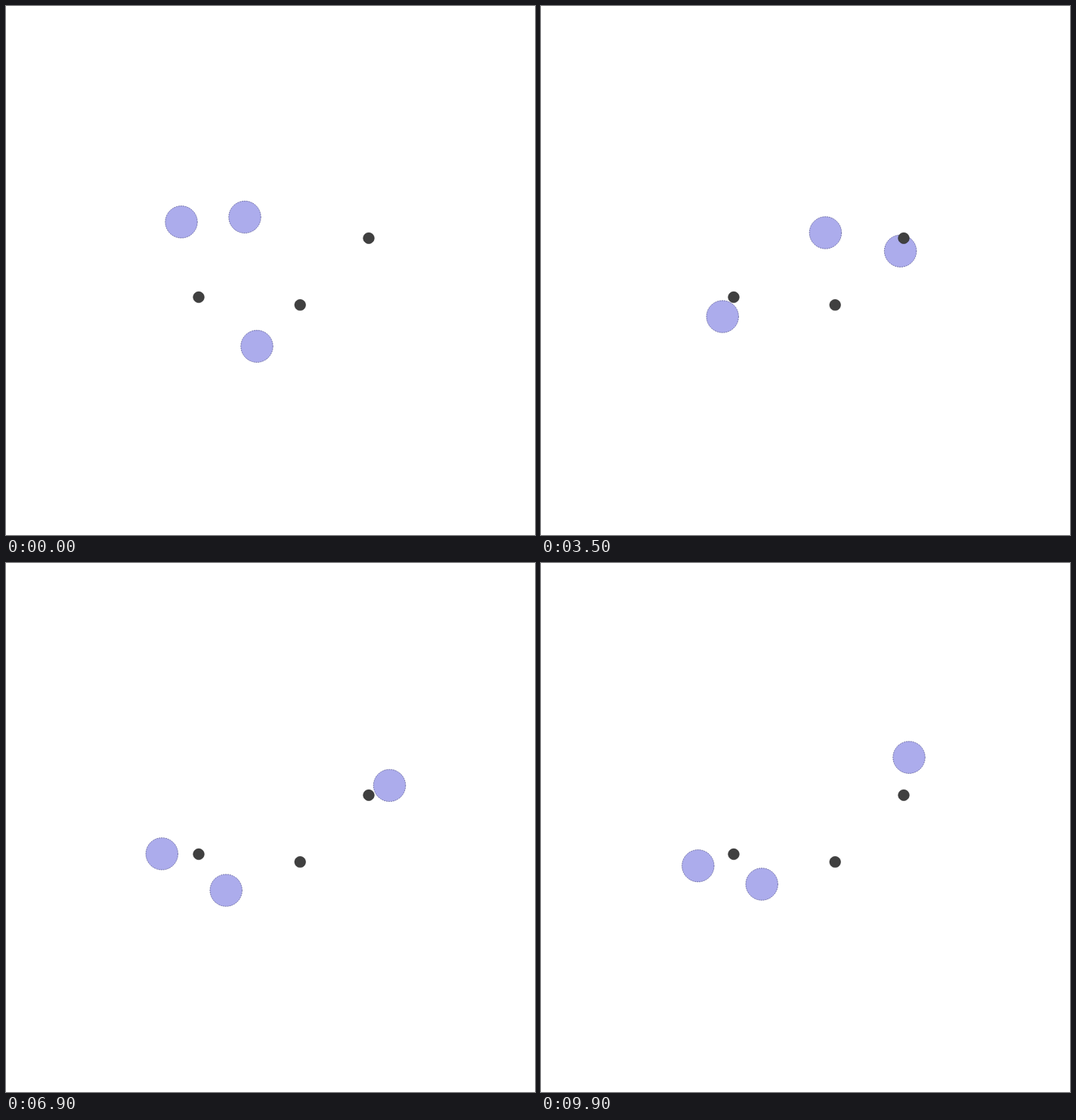
Recreate the animation shown at these times as an HTML page with a canvas. Size 700 by 700 pixels, loop 10 s.

```html
<!DOCTYPE html>
<html lang="en">
<head>
<meta charset="utf-8">
<title>Agents and landmarks</title>
<style>
  html, body { margin: 0; width: 100%; height: 100%; overflow: hidden; background: #fff; }
  canvas { display: block; }
</style>
</head>
<body>
<canvas id="stage" width="700" height="700"></canvas>
<script>
const ctx = document.getElementById('stage').getContext('2d');
const LOOP = 10000, STEP = 100;

const landmarks = [[255, 385.3], [389.2, 395.6], [480, 307.2]];

// Steps at which the agents pass their waypoints
const steps = [0, 4, 11, 20, 24, 35, 42, 50, 60, 72, 77, 83, 88, 94, 99];

const agents = [
  { x: [232, 234, 239, 244.4, 249, 240.2, 246, 282.6, 220.3, 204.5, 207, 206.5, 207, 204, 207.8],
    y: [285.8, 305, 357, 393, 403, 411, 423, 400, 386, 385, 385.4, 389, 393, 398, 400.7] },
  { x: [316, 345, 426, 456, 444, 376.4, 344, 324.6, 290, 293, 295.3, 296, 297, 296, 292.2],
    y: [279.3, 281, 283, 274.7, 257, 300, 336, 380.4, 424, 434, 430.7, 437, 442, 446, 425] },
  { x: [332, 342, 386, 468, 491, 475.6, 479, 493.6, 488, 513, 509, 522, 505.5, 494, 487],
    y: [450.3, 446, 412, 340, 323, 324.2, 297, 302.4, 307, 291, 295.2, 293, 281, 268, 257.2] }
];

// Smooth curve through the values, with slopes taken from the neighbours
function curve(values, step) {
  const last = steps.length - 1;
  const slope = i => {
    const p = Math.max(i - 1, 0), n = Math.min(i + 1, last);
    return (values[n] - values[p]) / (steps[n] - steps[p]);
  };
  let i = 0;
  while (i < last - 1 && steps[i + 1] <= step) i++;
  const span = steps[i + 1] - steps[i], u = (step - steps[i]) / span;
  return values[i] + (values[i + 1] - values[i]) * u * u * (3 - 2 * u)
    + span * u * (1 - u) * (slope(i) * (1 - u) - slope(i + 1) * u);
}

// Discs are polygons with thirty sides
function disc(x, y, radius, fill, line) {
  ctx.beginPath();
  for (let i = 0; i < 30; i++) {
    const angle = i * Math.PI / 15;
    ctx.lineTo(x + radius * Math.cos(angle), y + radius * Math.sin(angle));
  }
  ctx.closePath();
  ctx.fillStyle = fill;
  ctx.fill();
  ctx.strokeStyle = line;
  ctx.stroke();
}

function draw(now) {
  const step = Math.floor(now % LOOP / STEP);
  ctx.clearRect(0, 0, 700, 700);
  ctx.setLineDash([2, 1]);
  for (const { x, y } of agents) {
    disc(curve(x, step), curve(y, step), 21.3, '#acacec', 'rgba(45,45,108,.5)');
  }
  ctx.setLineDash([]);
  for (const [x, y] of landmarks) disc(x, y, 7.3, '#404040', 'rgba(32,32,32,.5)');
}

const start = performance.now();
function tick() {
  draw(performance.now() - start);
  requestAnimationFrame(tick);
}
tick();
</script>
</body>
</html>
```
